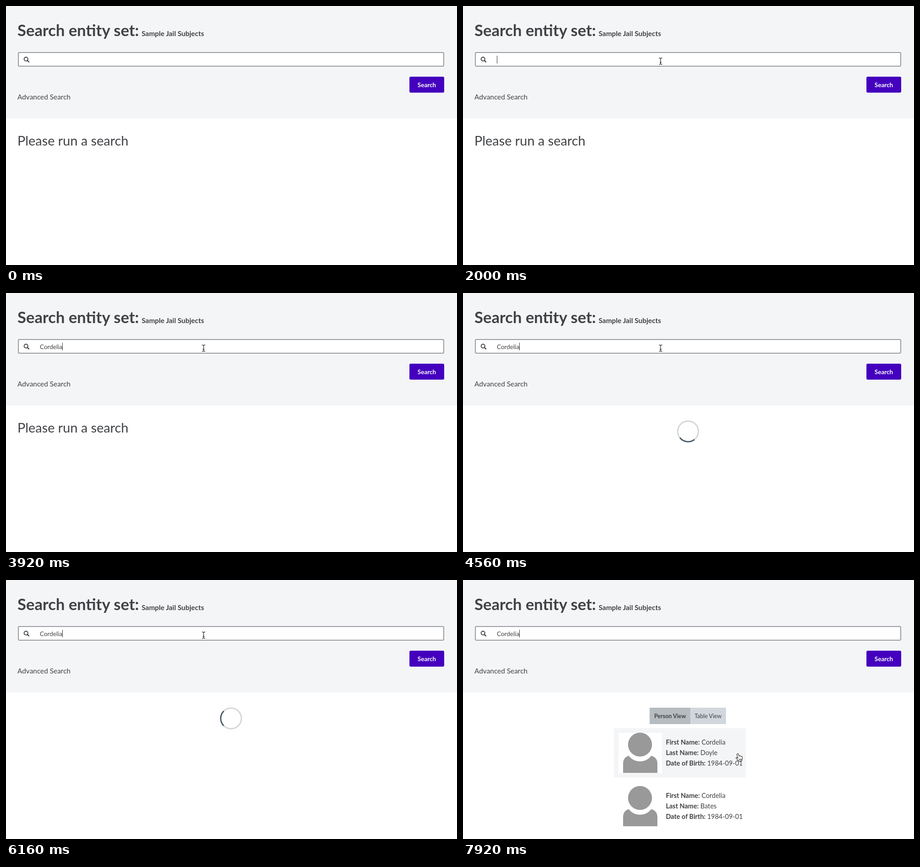
Animation of 986x568 px, one loop 8000 ms. Source, as an HTML page:

```html
<!DOCTYPE html>
<html lang="en">
<head>
<meta charset="utf-8">
<title>Entity search</title>
<style>
  html, body { margin: 0; width: 100%; height: 100%; overflow: hidden; background: #fff; }
  svg { display: block; width: 986px; height: 568px; }
  text { font-family: Lato, "Open Sans", sans-serif; fill: #404245; }
  .b { font-weight: 700; }
  .card text { font-size: 14.45px; }
  .tab { font-size: 12.5px; }
</style>
</head>
<body>
<svg viewBox="0 0 986 568">
  <defs>
    <g id="avatar" fill="#999">
      <circle cx="57" cy="36" r="26.2"/>
      <path d="M20 98V78Q20 64 32.500 60.500A30.500 30.500 0 0 0 81.500 60.500Q95 64 95 78V98Z"/>
    </g>
  </defs>
  <rect width="986" height="246.500" fill="#f4f5f7"/>
  <text class="b" x="25" y="66" font-size="34.6">Search entity set:</text>
  <text class="b" x="296.500" y="66" font-size="15.4">Sample Jail Subjects</text>

  <rect x="27" y="102" width="930" height="30" rx="2.500" fill="#fff" stroke="#999b9f" stroke-width="2"/>
  <g fill="none" stroke="#404245" stroke-width="1.9">
    <circle cx="43.700" cy="116.400" r="4.100"/>
    <path d="M46.700 119.400L50 122.700" stroke-width="2.300" stroke-linecap="round"/>
  </g>
  <text id="query" x="74" y="122.500" font-size="13.55"></text>
  <rect id="caret" y="109" width="1" height="17" fill="#333"/>

  <rect x="882" y="155" width="76" height="35" rx="3" fill="#4400be"/>
  <text class="b" x="920" y="178" font-size="13.5" text-anchor="middle" style="fill:#fff">Search</text>
  <text x="25" y="204.500" font-size="15.4">Advanced Search</text>

  <text id="prompt" x="25" y="306" font-size="28.9">Please run a search</text>

  <g id="spinner" fill="none" stroke-width="2.800">
    <circle cx="492" cy="303.500" r="22.600" stroke="#d2d4d6"/>
    <path id="arc" d="M476.020 287.520A22.600 22.600 0 0 1 507.980 287.520" stroke="#455a64"/>
  </g>

  <g id="results">
    <rect x="408" y="280" width="89" height="36" fill="#b7bcc0"/>
    <rect x="497" y="280" width="78" height="36" fill="#d1d7dc"/>
    <text class="tab b" x="452.700" y="302.500" text-anchor="middle">Person View</text>
    <text class="tab" x="535.800" y="302.500" text-anchor="middle">Table View</text>
    <g id="hover">
      <rect x="330" y="325" width="288.500" height="108" fill="#f4f5f7"/>
      <rect x="340" y="335" width="95" height="88.500" fill="#fff"/>
    </g>
  </g>

  <g id="cursor">
    <path id="arrow" d="M0 0V13.200L3 10.400L5.100 15.200L7.300 14.200L5.300 9.600H9.300Z"
      fill="#000" stroke="#fff" stroke-width="1" stroke-linejoin="round" paint-order="stroke"/>
    <g id="beam" fill="none" stroke-linecap="round">
      <path d="M-3 -7Q0 -7 0 -5Q0 -7 3 -7M0 -5V5M-3 7Q0 7 0 5Q0 7 3 7M-1.500 2.500H1.500" stroke="#333" stroke-width="1.300"/>
    </g>
    <path id="hand" d="M-2.500 -6.500Q-1 -8 0 -6.300L1.700 -1.800Q3 -3.200 4.200 -1.700Q5.600 -2.700 6.600 -1Q8.200 -1.600 8.600 .3Q9.300 3 8.200 5.500L7.600 9H.3L-1.500 6.300L-5 2.800Q-5.300 1 -3.500 1.100L-1 3L-3 -4.500Q-3.300 -5.800 -2.500 -6.500ZM2 4V7M4.200 4V7M6.300 4V7"
      fill="#fff" stroke="#222" stroke-width="1.100" stroke-linejoin="round"/>
  </g>
</svg>
<script>
const LOOP = 8000, STEP = 80;
const SEARCH = 4320, FOUND = 6640;
const NAME = 'Cordelia';
const $ = id => document.getElementById(id);
const show = (id, on) => { $(id).style.display = on ? '' : 'none'; };

// [time, letters typed]
const typing = [[0, 0], [3200, 1], [3360, 2], [3440, 3], [3520, 4], [3760, 5], [3840, 6], [3920, 8]];
// [time, caret visible]
const blink = [[0, 0], [2000, 1], [2480, 0], [2960, 1], [7120, 0], [7600, 1]];
// [time, x, y]
const path = [
  [880, 396, 368], [1040, 405, 212], [1200, 412, 144], [1360, 425, 126], [1520, 432, 121],
  [7520, 432, 121], [7600, 441, 135], [7680, 480, 198], [7760, 536, 286], [7840, 586, 362], [7920, 602, 388]
];

const held = (table, t) => table.filter(row => row[0] <= t).pop()[1];

function pointAt(t) {
  const i = path.findIndex(p => p[0] > t);
  if (i < 0) return path[path.length - 1].slice(1);
  const [t0, x0, y0] = path[i - 1], [t1, x1, y1] = path[i];
  const k = (t - t0) / (t1 - t0);
  return [x0 + (x1 - x0) * k, y0 + (y1 - y0) * k];
}

function addCard(top, last) {
  const rows = [['First Name:', NAME], ['Last Name:', last], ['Date of Birth:', '1984-09-01']];
  const lines = rows.map(([label, value], i) =>
    `<text x="443.500" y="${36 + i * 23}"><tspan class="b">${label}</tspan> ${value}</text>`);
  $('results').insertAdjacentHTML('beforeend',
    `<g class="card" transform="translate(0 ${top})"><use href="#avatar" x="330"/>${lines.join('')}</g>`);
}
addCard(325, 'Doyle');
addCard(442, 'Bates');

function drawCursor(t) {
  show('cursor', t >= path[0][0]);
  show('hover', false);
  if (t < path[0][0]) return;
  const [x, y] = pointAt(t);
  const inField = y > 101 && y < 133;
  const onCard = t >= FOUND && x > 330 && x < 618 && y > 325 && y < 433;
  $('cursor').setAttribute('transform', `translate(${x} ${y})`);
  show('beam', inField);
  show('hand', onCard);
  show('arrow', !inField && !onCard);
  show('hover', onCard);
}

function draw(t) {
  const query = $('query');
  query.textContent = NAME.slice(0, held(typing, t));
  const width = query.textContent ? query.getComputedTextLength() : 0;
  $('caret').setAttribute('x', 74 + Math.ceil(width - 0.2));
  show('caret', held(blink, t));

  show('prompt', t < SEARCH);
  show('spinner', t >= SEARCH && t < FOUND);
  show('results', t >= FOUND);
  const angle = 187 + (t - 4560) / 495.2 * 360;
  $('arc').setAttribute('transform', `rotate(${angle} 492 303.5)`);
  drawCursor(t);
}

const start = performance.now();
function tick() {
  const t = (performance.now() - start) % LOOP;
  draw(Math.floor(t / STEP) * STEP);
  requestAnimationFrame(tick);
}
tick();
</script>
</body>
</html>
```
